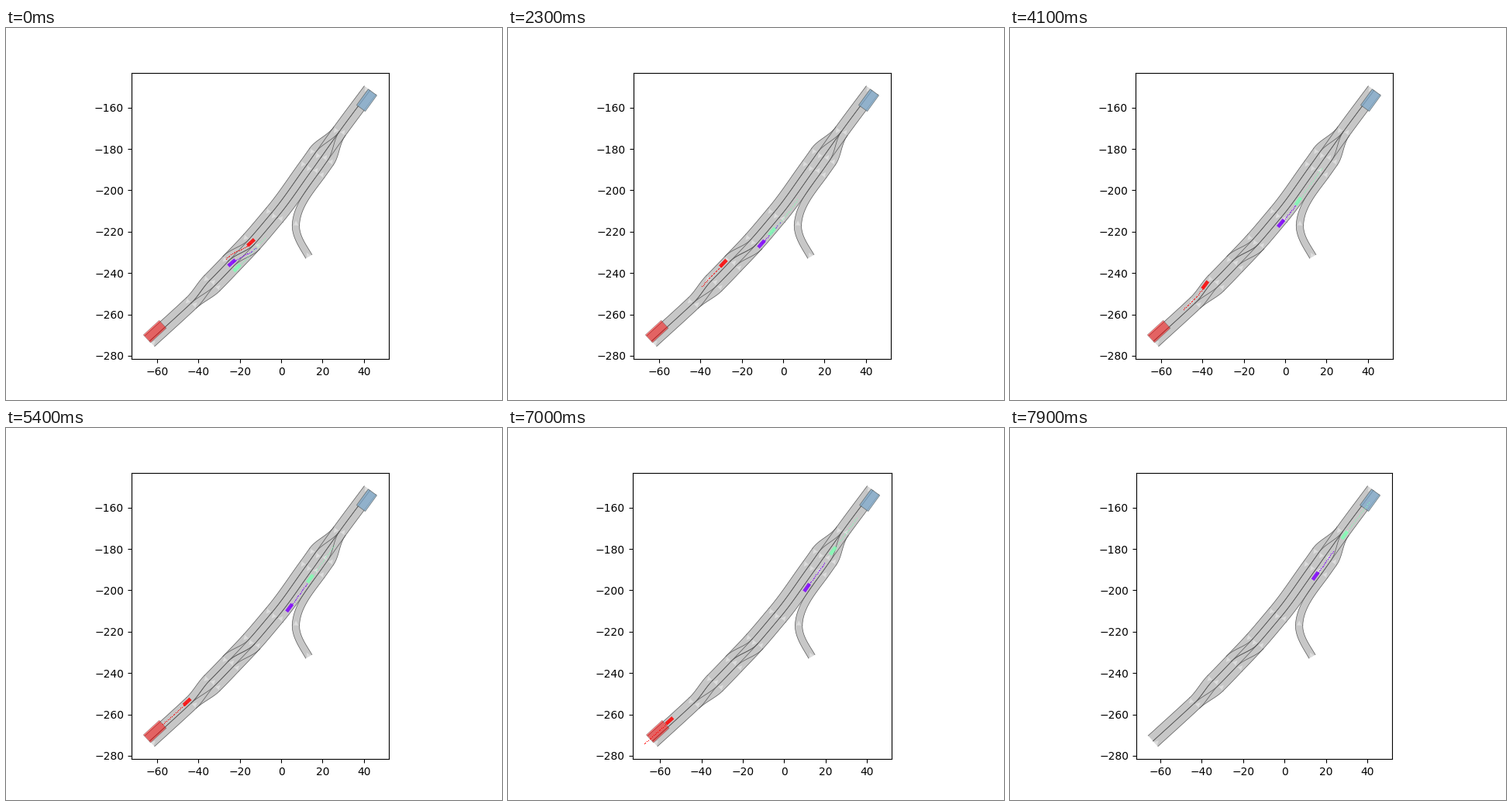
A matplotlib script for the animation above (8000 ms loop, 640 px wide and 480 px high).

```python
import numpy as np
import matplotlib.pyplot as plt
from matplotlib.animation import FuncAnimation
from matplotlib.patches import Polygon

FRAMES, STEP_MS = 80, 100
LANE = 3.5              # lane width
RED_EXIT = 7.5          # seconds; red has reached its goal
HORIZON = 19            # predicted steps of 0.1 s
RED, GREEN, PURPLE = (1, 0, 0), (0.5, 1, 0.705), (0.5, 0, 1)

# Road cross sections: centre x, centre y, lanes down, lanes up
SECTIONS = [
    (-63.6, -272.9, 1, 1), (-43.5, -254.5, 1, 1), (-33.4, -244.9, 1, 2),
    (-24.3, -235.5, 1, 2), (-14.2, -224.8, 2, 1), (-3.2, -211.9, 2, 1),
    (15.1, -189.9, 2, 2), (19.5, -183.7, 2, 2), (28.2, -171.5, 1, 1),
    (43.0, -151.6, 1, 1),
]
# On-ramp centre points with headings; it feeds the last lane of section 6
RAMP = [(13.4, -232.0, 120), (7.1, -216.8, 88)]
RAMP_SECTION = 6


def unit(angle):
    return np.array([np.cos(angle), np.sin(angle)])


def normal(angle):
    return unit(angle - np.pi / 2)


def curve(p, angle_p, q, angle_q):
    """Hermite curve between two points with given headings."""
    size = np.hypot(*(q - p))
    m, n = size * unit(angle_p), size * unit(angle_q)
    u = np.linspace(0, 1, 25)[:, None]
    return ((2 * u**3 - 3 * u**2 + 1) * p + (u**3 - 2 * u**2 + u) * m
            + (3 * u**2 - 2 * u**3) * q + (u**3 - u**2) * n)


centers = np.array([s[:2] for s in SECTIONS])
arc = np.r_[0, np.cumsum(np.hypot(*np.diff(centers, axis=0).T))]
slope = np.gradient(centers, arc, axis=0)
heading = np.arctan2(slope[:, 1], slope[:, 0])


def across(i, lane):
    """Point on section i, counted in lanes from its left end."""
    total = sum(SECTIONS[i][2:])
    return centers[i] + (lane - total / 2) * LANE * normal(heading[i])


def link(i, a, j, b):
    return curve(across(i, a), heading[i], across(j, b), heading[j])


def lane_pairs(n, m):
    """Lanes joined side by side; the innermost one splits or merges."""
    return [(min(k, n - 1), min(k, m - 1)) for k in range(max(n, m))]


def lanelet(left, right, start, angle):
    ax.add_patch(Polygon(np.vstack([left, right[::-1]]), fc="#c7c7c7",
                         ec="none", zorder=1))
    for line in (left, right):
        ax.plot(*line.T, color="#555555", lw=0.5, zorder=3)
    side = 1.1 * normal(angle)
    ax.add_patch(Polygon([start - side, start + 2.2 * unit(angle), start + side],
                         fc="#dddddd", ec="none", zorder=2))


def draw_road():
    for i in range(len(SECTIONS) - 1):
        j = i + 1
        (d0, u0), (d1, u1) = SECTIONS[i][2:], SECTIONS[j][2:]
        for a, b in lane_pairs(d0, d1):
            lanelet(link(i, a, j, b), link(i, a + 1, j, b + 1),
                    across(j, b + 0.5), heading[j] + np.pi)
        fed = j == RAMP_SECTION
        for a, b in lane_pairs(u0, u1 - fed):
            a, b = d0 + u0 - 1 - a, d1 + u1 - 1 - fed - b
            lanelet(link(i, a, j, b), link(i, a + 1, j, b + 1),
                    across(i, a + 0.5), heading[i])


def draw_ramp():
    points = [(np.array([x, y]), np.radians(deg)) for x, y, deg in RAMP]
    points.append((across(RAMP_SECTION, 3.5), heading[RAMP_SECTION]))
    for (p, a), (q, b) in zip(points, points[1:]):
        sides = [curve(p + k * LANE / 2 * normal(a), a,
                       q + k * LANE / 2 * normal(b), b) for k in (-1, 1)]
        lanelet(*sides, p, a)


def box(center, length, width, angle):
    d, n = length / 2 * unit(angle), width / 2 * normal(angle)
    return [center - d - n, center + d - n, center + d + n, center - d + n]


def goal(x, y, length, deg, color):
    corners = box(np.array([x, y]), length, 5.1, np.radians(deg))
    return ax.add_patch(Polygon(corners, fc=color, ec="#555555", lw=0.5,
                                alpha=0.5, zorder=4))


class Car:
    """Follows the middle of its lanes with constant acceleration."""

    def __init__(self, color, first, lanes, speed, accel=0):
        self.speed, self.accel = speed, accel
        stops = [(first + k, lane + 0.5) for k, lane in enumerate(lanes)]
        path = np.vstack([link(*p, *q) for p, q in zip(stops, stops[1:])])
        if color == RED:
            path = path[::-1]
        # carry straight on past the end of the road
        tail = path[-1] - path[-2]
        self.path = np.vstack([path, path[-1] + 20 * tail / np.hypot(*tail)])
        self.dist = np.r_[0, np.cumsum(np.hypot(*np.diff(self.path, axis=0).T))]
        self.trail, = ax.plot([], [], "o", ms=0.9, mew=0, color=color, zorder=5)
        self.body = ax.add_patch(Polygon(np.zeros((4, 2)), fc=color, ec="none",
                                         alpha=0.85, zorder=6))

    def move(self, t):
        t = t + 0.1 * np.arange(HORIZON + 1)
        s = 0.6 + self.speed * t + self.accel * t**2 / 2
        p = np.column_stack([np.interp(s, self.dist, c) for c in self.path.T])
        d = p[1] - p[0]
        self.body.set_xy(box(p[0], 4.5, 1.75, np.arctan2(d[1], d[0])))
        self.trail.set_data(*p[1:].T)
        return p

    def show(self, on):
        self.body.set_visible(on)
        self.trail.set_visible(on)


fig, ax = plt.subplots(figsize=(6.4, 4.8), dpi=100)
draw_road()
draw_ramp()
red_goal = goal(-61.1, -268.3, 10.4, 42.5, RED)
for tint in (PURPLE, GREEN):
    goal(41.4, -156.4, 9.5, 54, tint)

red = Car(RED, 0, [0, 0, 0, 0, 1], 7.5, 0.15)
others = [Car(PURPLE, 3, [1, 2, 2, 2, 2, 1, 1], 7.0, 0.085),
          Car(GREEN, 3, [2, 2, 2, 2, 2, 1, 1], 10.35)]

ax.set_aspect("equal")
ax.set_ylim(-281.63, -143.05)
ax.set_xticks(range(-60, 41, 20))
ax.set_yticks(range(-280, -159, 20))


def update(frame):
    t = frame * STEP_MS / 1000
    for car in others:
        car.move(t)
    ahead = red.move(t)
    active = t < RED_EXIT
    red.show(active)
    red_goal.set_visible(active)
    # the view hugs everything drawn, with a 5 % margin
    low = min(-66.78, ahead[:, 0].min()) if active else -66.125
    high = 46.5
    pad = 0.05 * (high - low)
    ax.set_xlim(low - pad, high + pad)
    return []


anim = FuncAnimation(fig, update, frames=FRAMES, interval=STEP_MS,
                     repeat=True, repeat_delay=0, blit=False)
plt.show()
```
